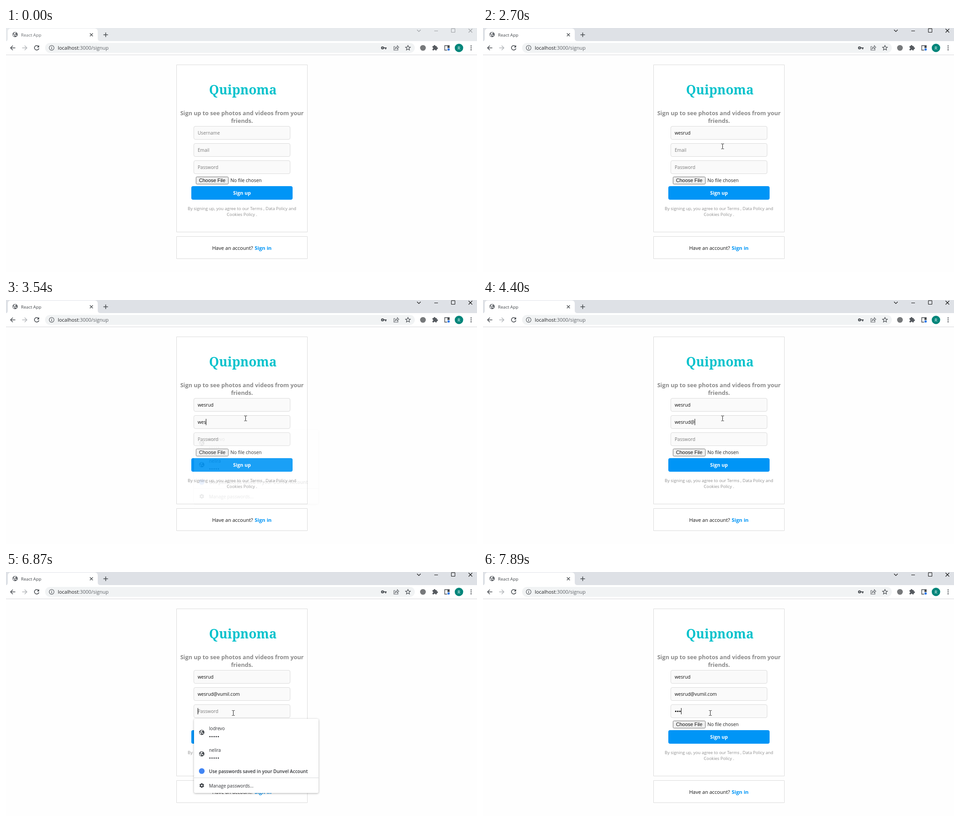
An HTML page with a canvas that plays this animation: 1037 px wide and 540 px high, repeating every 8000 ms.

```html
<!DOCTYPE html>
<html lang="en">
<head>
<meta charset="utf-8">
<title>Sign up form</title>
<style>
  html, body { margin: 0; width: 100%; height: 100%; overflow: hidden; background: #fefefe; }
  canvas { display: block; }
</style>
</head>
<body>
<canvas id="stage" width="1037" height="540"></canvas>
<script>
const LOOP = 8000;
const SANS = '"Open Sans", "Noto Sans", sans-serif';
const ICON = '#5f6368';
const LINE = '#dbdbdb';
const NAME = 'wesrud';
const EMAIL = 'wesrud@vumil.com';

// [time, number of characters]
const NAME_KEYS = [[1290, 1], [1440, 2], [1670, 3], [1920, 5], [2150, 6]];
const EMAIL_KEYS = [[3380, 2], [3540, 3], [3770, 4], [3850, 5], [4000, 6], [4400, 7], [4720, 8],
  [4850, 9], [5030, 10], [5100, 11], [5250, 12], [5480, 13], [5560, 14], [5640, 15], [5790, 16]];
const PASS_KEYS = [[7420, 1], [7590, 2], [7890, 3]];

// [time, opacity]
const EMAIL_POPUP = [[2850, 1], [3380, .75], [3460, .4], [3540, .1], [3620, 0]];
const PASS_POPUP = [[6870, 1], [7500, .75], [7590, .35], [7660, 0]];

// [time, focused field], -1 for no caret
const FOCUS = [[740, 0], [2530, -1], [2850, 1], [6340, -1], [6870, 2]];

const MOVES = [
  { start: 210, end: 590, steps: 6, from: [808, 381], to: [548, 237] },
  { start: 2530, end: 2700, steps: 3, from: [548, 237], to: [527, 262] },
  { start: 6340, end: 6800, steps: 7, from: [527, 262], to: [500, 312] }
];

const stage = document.getElementById('stage').getContext('2d');
let g = stage;

function at(keys, t, initial) {
  let value = initial;
  for (const [time, v] of keys) if (t >= time) value = v;
  return value;
}

function text(str, x, y, size, color, weight = 400, align = 'left', family = SANS) {
  g.font = `${weight} ${size}px ${family}`;
  g.textAlign = align;
  g.fillStyle = color;
  g.fillText(str, x, y);
}

function box(x, y, w, h, r, fill, stroke) {
  g.beginPath();
  g.roundRect(x, y, w, h, r);
  if (fill) { g.fillStyle = fill; g.fill(); }
  if (stroke) { g.strokeStyle = stroke; g.lineWidth = 1; g.stroke(); }
}

function disc(x, y, r, color) {
  g.beginPath();
  g.arc(x, y, r, 0, 7);
  g.fillStyle = color;
  g.fill();
}

function ring(x, y, r, color, width = 1.3) {
  g.beginPath();
  g.arc(x, y, r, 0, 7);
  g.strokeStyle = color;
  g.lineWidth = width;
  g.stroke();
}

// Strokes or fills SVG path data around (x, y).
function icon(d, x, y, color, width = 1.4, filled = false) {
  g.save();
  g.translate(x, y);
  g.strokeStyle = g.fillStyle = color;
  g.lineWidth = width;
  const path = new Path2D(d);
  if (filled) g.fill(path); else g.stroke(path);
  g.restore();
}

function globe(x, y, color) {
  disc(x, y, 5.8, color);
  icon('M-4.7 -1L-1.5 2V4.5C-4 3.5 -5 1.5 -4.7 -1ZM-1 -4.6L2 -4.4L1.5 -2.5L-1 -1.5V0H2L3 2.5L4.5 1L3.2 3.6L1 2.3L-2 0L-3 -2.2Z',
    x, y, '#fff', 1, true);
}

function gear(x, y, color) {
  for (let i = 0; i < 6; i++) {
    g.save();
    g.translate(x, y);
    g.rotate(i * Math.PI / 3);
    box(-1.4, -5.2, 2.8, 3, 0, color);
    g.restore();
  }
  disc(x, y, 4, color);
  disc(x, y, 1.7, '#fff');
}

function bullets(n, x, y, step, r, color) {
  for (let i = 0; i < n; i++) disc(x + i * step, y, r, color);
}

function drawTabs(active) {
  box(0, 0, 1037, 29, 0, active ? '#dee1e6' : '#e7eaed');
  g.beginPath();
  g.moveTo(0, 29);
  g.quadraticCurveTo(4, 29, 4, 23);
  g.lineTo(4, 8);
  g.quadraticCurveTo(4, 1, 11, 1);
  g.lineTo(195, 1);
  g.quadraticCurveTo(202, 1, 202, 8);
  g.lineTo(202, 23);
  g.quadraticCurveTo(202, 29, 208, 29);
  g.fillStyle = '#fff';
  g.fill();
  globe(20, 14.5, ICON);
  text('React App', 33, 18.5, 9.6, active ? '#45494d' : '#6c7074');
  icon('M-3.3 -3.3L3.3 3.3M3.3 -3.3L-3.3 3.3', 188, 15, '#45494d', 1.3);
  icon('M-5 0H5M0 -5V5', 219.5, 15, '#45494d', 1.5);

  const color = active ? '#111' : '#9a9da1';
  icon('M-4 -2L0 2L4 -2', 909, 6, color, 1.1);
  icon('M-4 .5H4', 947, 6, color, 1);
  icon('M-3.5 -3.5H4.5V4.5H-3.5Z', 984, 5, color, 1);
  icon('M-4 -4L4 4M4 -4L-4 4', 1022.5, 6, color, 1.1);
}

function drawToolbar() {
  box(0, 29, 1037, 30, 0, '#fff');
  box(0, 59, 1037, 1, 0, '#d5d7da');
  icon('M5.5 0H-5M0 -5L-5 0L0 5', 15, 44, '#4d5156', 1.5);
  icon('M-5.5 0H5M0 -5L5 0L0 5', 41, 44, '#b4b7ba', 1.5);
  icon('M4 -3.4A5 5 0 1 0 5 1', 67.5, 44, '#4d5156', 1.6);
  icon('M5.5 -6V-1H.5Z', 67.5, 44, '#4d5156', 1, true);

  box(86, 33, 814, 22, 11, '#f1f3f4');
  ring(100.5, 44, 5.3, ICON, 1.2);
  icon('M0 -1V3M0 -3V-1.8', 100.5, 44, ICON);
  text('localhost', 114, 47.5, 10.95, '#202124');
  const host = g.measureText('localhost').width;
  text(':3000/signup', 114 + host, 47.5, 10.95, ICON);

  ring(829, 44, 2.2, '#4d5156', 2.2);
  icon('M3 0H10M8 0V3.2', 828, 44, '#4d5156', 2.1);
  icon('M-2 -3H-5V5H4V2M-2.5 2C-2 -1 0 -2.2 2.5 -2.2V-5L6 -1.3L2.5 2V0C0 0 -1.5 .5 -2.5 2Z', 859, 44, ICON, 1.1);
  icon('M0 -5.4L1.6 -1.8L5.4 -1.5L2.5 1L3.4 4.8L0 2.8L-3.4 4.8L-2.5 1L-5.4 -1.5L-1.6 -1.8Z', 885, 44, '#4d5156', 1.2);

  disc(918, 44, 6.3, '#77797b');
  box(939, 40, 9.5, 9.5, 1, '#55595e');
  disc(943.5, 39.7, 2, '#55595e');
  disc(949, 44.7, 2, '#55595e');
  disc(939.2, 44.7, 1.5, '#fff');
  disc(943.7, 49.3, 1.5, '#fff');
  icon('M-5 -5H5V5H-5Z', 971, 44, '#45494d', 1.4);
  box(972, 39, 4, 6, 0, '#45494d');
  disc(974.5, 47.5, 3.5, '#fff');
  disc(974.5, 47.5, 2.5, '#1a73e8');
  disc(997.3, 44, 9.3, '#00857a');
  text('R', 997.3, 47.5, 9.5, '#fff', 400, 'center');
  for (const y of [39.8, 44, 48.2]) disc(1024, y, 1.3, '#4d5156');
}

function drawField(i, label, value) {
  const y = 217.5 + i * 38;
  box(413.5, y, 212, 29, 3.5, '#fafafa', LINE);
  text(value || label, 422, y + 18.5, 10.1, value ? '#111' : '#7a7a7a');
  return value ? g.measureText(value).width : 0;
}

function drawForm(t) {
  box(0, 60, 1037, 480, 0, '#fefefe');
  box(375.5, 81.5, 288, 370, 0, '#fff', LINE);
  box(375.5, 461.5, 288, 49, 0, '#fff', LINE);
  text('Quipnoma', 521.5, 146.5, 28, '#06c2cc', 700, 'center', '"Noto Serif", serif');
  text('Sign up to see photos and videos from your', 519.5, 192.5, 12.66, '#8a8a8a', 700, 'center');
  text('friends.', 519.5, 210, 12.66, '#8a8a8a', 700, 'center');

  const dots = at(PASS_KEYS, t, 0);
  const widths = [
    drawField(0, 'Username', NAME.slice(0, at(NAME_KEYS, t, 0))),
    drawField(1, 'Email', EMAIL.slice(0, at(EMAIL_KEYS, t, 0))),
    drawField(2, dots ? '' : 'Password', '')
  ];
  bullets(dots, 424.4, 308.3, 4.6, 1.6, '#111');
  widths[2] = dots * 4.7;

  const focus = at(FOCUS, t, -1);
  if (focus >= 0) box(Math.round(422 + widths[focus]), 225 + focus * 38, 1, 14, 0, '#111');

  box(418.5, 329.5, 71, 16, 2, '#efefef', '#767676');
  text('Choose File', 454, 341, 10.9, '#111', 400, 'center', '"Liberation Sans", Arial, sans-serif');
  text('No file chosen', 494, 341, 10.4, '#222');
  box(408, 350, 223, 30, 4, '#0095f6');
  text('Sign up', 519.5, 369, 10.75, '#fff', 700, 'center');
  text('By signing up, you agree to our Terms , Data Policy and', 519.5, 403, 9.4, '#8e8e8e', 400, 'center');
  text('Cookies Policy .', 519.5, 416, 9.4, '#8e8e8e', 400, 'center');
  text('Have an account?', 454, 490.5, 11, '#111');
  text('Sign in', 547.5, 490.5, 11.3, '#0095f6', 700);
}

// The password list is painted once, with a margin of 6 for its shadow.
function makePopup() {
  const canvas = document.createElement('canvas');
  canvas.width = 290;
  canvas.height = 180;
  g = canvas.getContext('2d');
  g.translate(6, 6);
  g.shadowColor = 'rgba(0,0,0,.32)';
  g.shadowBlur = 4;
  g.shadowOffsetY = 1;
  box(0, 0, 274, 164, 3, '#fff');
  g.shadowColor = 'transparent';
  ['lodrevo', 'nelira'].forEach((user, i) => {
    const y = i * 47.5;
    globe(17, 30 + y, '#41454a');
    text(user, 33, 25 + y, 9.95, '#303236');
    bullets(5, 35, 39.3 + y, 4.6, 1.4, '#303236');
  });
  disc(17, 115.5, 6.3, '#4285f4');
  text('Use passwords saved in your Dunvel Account', 33, 120, 10, '#303236', 600);
  box(0, 130, 274, 1, 0, '#d8dadd');
  gear(17, 147.5, '#41454a');
  text('Manage passwords...', 33, 152, 10, '#303236');
  g = stage;
  return canvas;
}

function drawPopup(canvas, alpha, y) {
  if (!alpha) return;
  g.globalAlpha = alpha;
  g.drawImage(canvas, 408, y - 6);
  g.globalAlpha = 1;
}

function drawPointer(t) {
  const move = MOVES.filter(m => t >= m.start).pop();
  if (!move) return;
  const { start, end, steps, from, to } = move;
  const step = Math.min(steps - 1, Math.floor((t - start) / (end - start) * (steps - 1) + 1e-6));
  const p = 1 - (1 - step / (steps - 1)) ** 2;
  const x = Math.round(from[0] + (to[0] - from[0]) * p);
  const y = Math.round(from[1] + (to[1] - from[1]) * p);
  const row = (y - 217) % 38;
  const overField = x > 413 && x < 626 && y > 217 && y < 323 && row < 30;
  if (overField) {
    icon('M-2.5 -5.5H-.5L.5 -5L1.5 -5.5H3.5M.5 -5V5M-2.5 5.5H-.5L.5 5L1.5 5.5H3.5', x, y, '#222', 1);
  } else {
    const arrow = 'M0 0V15L3.5 11.8L6 17.3L8.2 16.3L5.8 11H10.5Z';
    icon(arrow, x, y, '#fff', 1, true);
    icon(arrow, x, y, '#111', 1);
  }
}

const popup = makePopup();

function frame(now) {
  const t = now % LOOP;
  drawTabs(t >= 740);
  drawToolbar();
  drawForm(t);
  drawPopup(popup, at(EMAIL_POPUP, t, 0), 287);
  drawPopup(popup, at(PASS_POPUP, t, 0), 325);
  drawPointer(t);
  requestAnimationFrame(frame);
}
requestAnimationFrame(frame);
</script>
</body>
</html>
```
